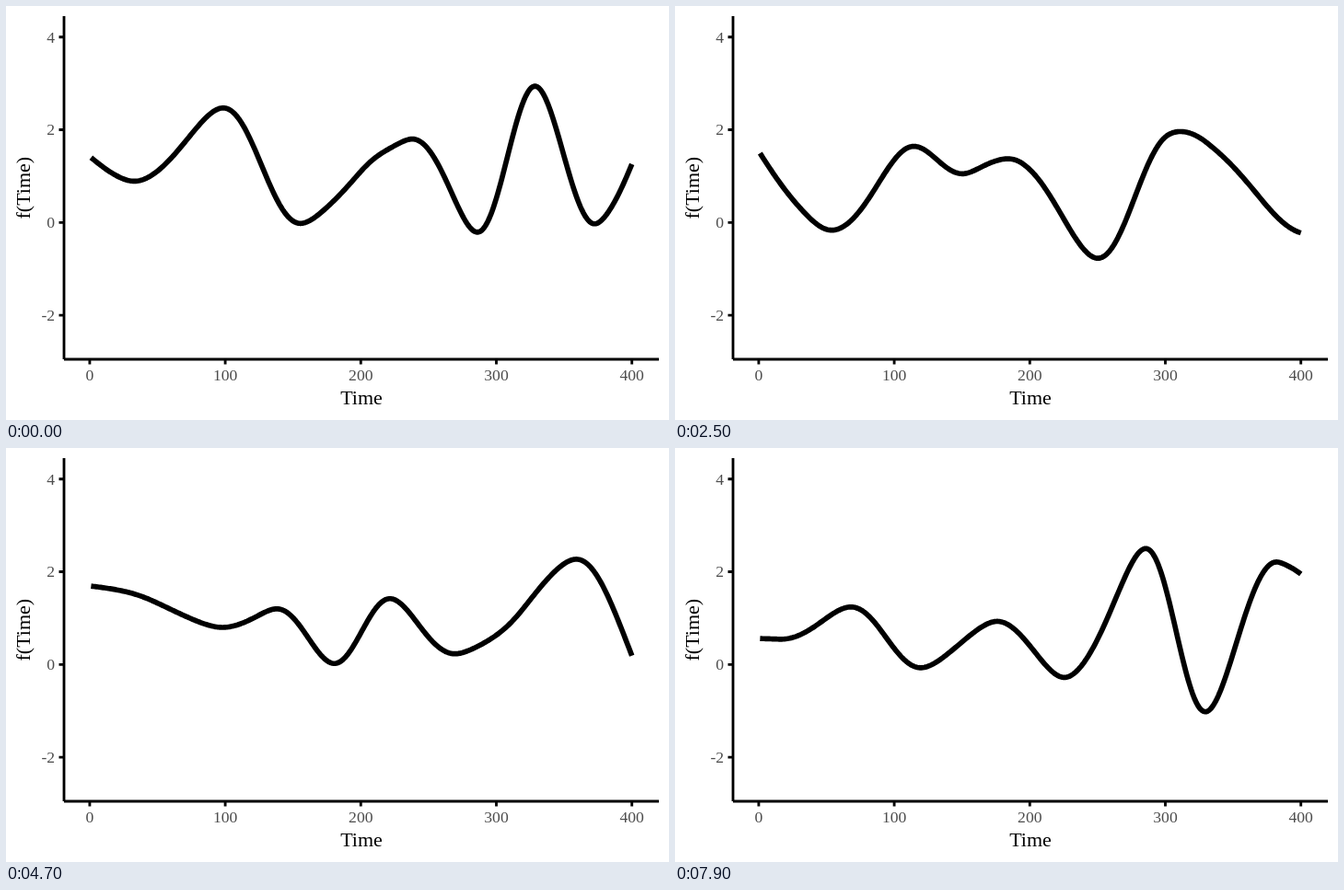
Recreate the animation shown at these times as an HTML page. Size 720 by 450 pixels, loop 8000 ms.

```html
<!DOCTYPE html>
<html lang="en">
<head>
<meta charset="utf-8">
<title>f(Time)</title>
<style>
  html, body { margin: 0; width: 100%; height: 100%; overflow: hidden; background: #fff; }
  svg { display: block; width: 720px; height: 450px; }
  text { font-family: "Liberation Serif", "Times New Roman", serif; }
  .tick { font-size: 17.6px; fill: #4d4d4d; }
  .title { font-size: 22px; fill: #000; text-anchor: middle; }
  path { fill: none; stroke: #000; }
  #axes { stroke-width: 2.85; }
  #curve { stroke-width: 5.69; stroke-linejoin: round; }
</style>
</head>
<body>
<svg viewBox="0 0 720 450">
  <path id="curve"/>
  <path id="axes"/>
  <g id="labels"></g>
  <text class="title" x="386" y="433">Time</text>
  <text class="title" transform="translate(26 197.7) rotate(-90)">f(Time)</text>
</svg>
<script>
const LOOP = 8000, STEP = 100;
const px = time => 90.9 + 1.472 * time;
const py = value => 235.3 - 50.4 * value;

// Smooth curve through [time, value] keys, sampled at each time from 1 to 400.
// Turning points are level; the other keys take the slope of a cubic spline.
function smooth(...keys) {
  const last = keys.length - 1;
  const h = [], s = [];
  for (let i = 0; i < last; i++) {
    h[i] = keys[i + 1][0] - keys[i][0];
    s[i] = (keys[i + 1][1] - keys[i][1]) / h[i];
  }

  const m = keys.map(() => 0);
  for (let pass = 0; pass < 20; pass++) {
    m[0] = (3 * s[0] - m[1]) / 2;
    m[last] = (3 * s[last - 1] - m[last - 1]) / 2;
    for (let i = 1; i < last; i++) {
      if (s[i - 1] * s[i] <= 0) continue;
      m[i] = (h[i] * (3 * s[i - 1] - m[i - 1]) + h[i - 1] * (3 * s[i] - m[i + 1])) /
        (2 * (h[i - 1] + h[i]));
    }
  }

  // Curvature on both sides of a key, and their mean
  const after = i => (6 * s[i] - 4 * m[i] - 2 * m[i + 1]) / h[i];
  const before = i => (2 * m[i - 1] + 4 * m[i] - 6 * s[i - 1]) / h[i - 1];
  const bend = keys.map((_, i) => i === 0 || i === last ? 0 : (after(i) + before(i)) / 2);

  let k = 0;
  return Array.from({ length: 400 }, (_, i) => {
    while (k < last - 1 && i + 1 > keys[k + 1][0]) k++;
    const u = (i + 1 - keys[k][0]) / h[k], v = 1 - u;
    const cubic = keys[k][1] * v * v * (1 + 2 * u) + keys[k + 1][1] * u * u * (3 - 2 * u) +
      h[k] * u * v * (m[k] * v - m[k + 1] * u);
    const extra = (bend[k] - after(k)) * v + (bend[k + 1] - before(k + 1)) * u;
    return cubic + (u * v * h[k]) ** 2 / 2 * extra;
  });
}

const blend = (p, q, wp, wq) => p.map((v, i) => wp * v + wq * q[i]);
// The curve on the other side of a halfway curve
const mirror = (half, p) => blend(half, p, 2, -1);

const first = smooth([1, 1.4], [33, 0.89], [98.5, 2.47], [155.5, -0.02], [200, 1.1],
  [238, 1.8], [286, -0.21], [328.5, 2.94], [372.5, -0.03], [400, 1.26]);
const half23 = smooth([1, 1.4], [49, -0.8], [111, 1.75], [152, 0.48], [189.5, 1.08],
  [249, -0.57], [300.5, 1.65], [333, 1.05], [365, 0.78], [400, 0.33]);
const fourth = smooth([1, 1.96], [31.5, 3.38], [83.5, 0.79], [143, 3.73], [199, 0.76],
  [223, 0.91], [269, 0.57], [345.5, 1.98], [400, 0.67]);
const half56 = smooth([1, 1.69], [40, 1.45], [98, 0.8], [138, 1.2], [180.5, 0.02],
  [221.5, 1.42], [269.5, 0.23], [318, 1.14], [359, 2.27], [400, 0.19]);
const half67 = smooth([1, 1.34], [33, 0.94], [70, 1.3], [112.5, 0.57], [171.5, 1.47],
  [245, 0.68], [260, 0.68], [298, 0.64], [325, 0.95], [364, 1.95], [400, 0.62]);
const half78 = smooth([1, 1.28], [53, 0.71], [115, 1.02], [128, 1.02], [175.5, 1.25],
  [210, 0.83], [255, 2.41], [317, -0.02], [366, 1.12], [400, 1.63]);
const nearLast = smooth([1, 0.56], [16, 0.545], [68, 1.24], [119.5, -0.07], [176, 0.93],
  [225.5, -0.28], [285.5, 2.5], [329.5, -1.02], [382, 2.21], [400, 1.95]);
const sixth = smooth([1, 1.5], [140, 0.55], [174, -0.12], [215, 0.08], [255, -0.28],
  [318, 1.45], [360, 2.15], [400, 0.73]);

const swing = half23.map((_, t) => t / 500 * Math.cos(2 * Math.PI * (t - 110) / 140));
const seventh = mirror(half67, sixth);
const eighth = mirror(half78, seventh);
const states = [
  first,
  blend(half23, swing, 1, 1),
  blend(half23, swing, 1, -1),
  fourth,
  mirror(half56, sixth),
  sixth,
  seventh,
  eighth,
  blend(nearLast, eighth, 6 / 5, -1 / 5)
];

function drawAxes() {
  let path = "M63 11V384M63 384H709", labels = "";
  for (let t = 0; t <= 400; t += 100) {
    path += `M${px(t)} 384v5.5`;
    labels += `<text class="tick" text-anchor="middle" x="${px(t)}" y="406.5">${t}</text>`;
  }
  for (let v = -2; v <= 4; v += 2) {
    path += `M63 ${py(v)}h-5.5`;
    labels += `<text class="tick" text-anchor="end" x="53.1" y="${py(v) + 5.8}">${v}</text>`;
  }
  document.getElementById("axes").setAttribute("d", path);
  document.getElementById("labels").innerHTML = labels;
}

const curve = document.getElementById("curve");

// Each state rests, then moves to the next in even steps.
function draw(ms) {
  const n = Math.floor(ms % LOOP / STEP);
  const i = Math.max(0, Math.floor((n - 4) / 10));
  const raw = i === 0 ? (n - 3) / 7 : (n - 10 * i - 4) / 6;
  const k = Math.min(1, Math.max(0, raw));
  const values = blend(states[i], states[i + 1], 1 - k, k);
  const points = values.map((v, j) => px(j + 1).toFixed(2) + " " + py(v).toFixed(2));
  curve.setAttribute("d", "M" + points.join("L"));
}

drawAxes();
const start = performance.now();
function tick() {
  draw(performance.now() - start);
  requestAnimationFrame(tick);
}
tick();
</script>
</body>
</html>
```
